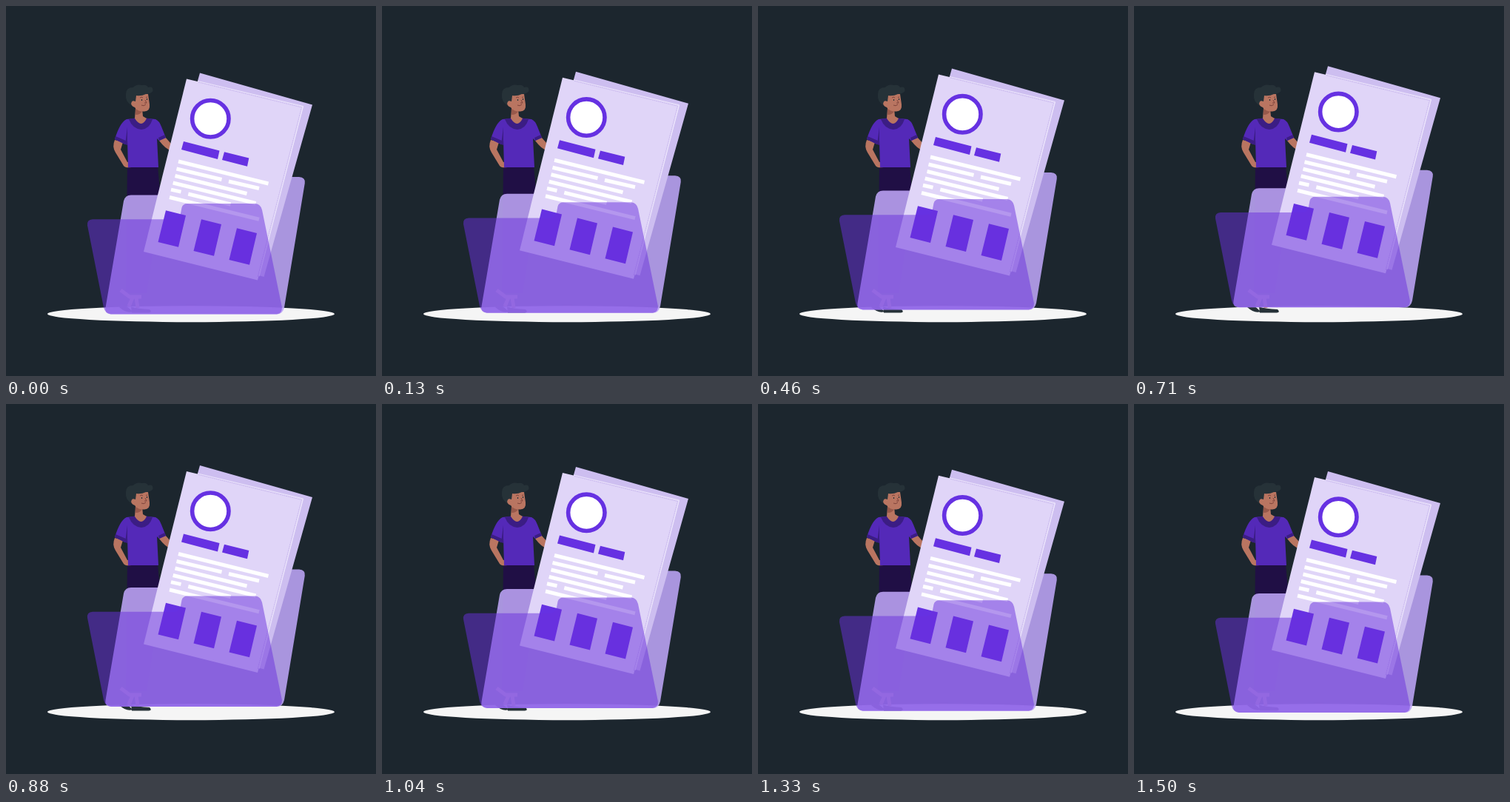
These frames come from a looping animation (500 px wide and 500 px high, 1.54 s). An HTML page:

```html
<!DOCTYPE html>
<html lang="en">
<head>
<meta charset="utf-8">
<title>Floating folder</title>
<style>
  html, body { margin: 0; width: 100%; height: 100%; overflow: hidden; background: #1c262e; }
  svg { display: block; width: 100%; height: 100%; }
</style>
</head>
<body>
<svg viewBox="0 0 500 500">
  <ellipse cx="250" cy="416.2" rx="194" ry="11" fill="#f5f5f5"/>

  <g id="man">
    <path d="M164 216 H205 L209 262 L190 388 H162 Z" fill="#200f45"/>
    <path d="M155 384 L167 393 H183 M171 394 L166 406 M176 394 L178 408" fill="none" stroke="#c98a70" stroke-width="5"/>
    <path d="M155 403 Q164 405 171 413 Q163 416 153 407 Z M169 406.500 Q178 409 194 410 Q198 414 193 414.500 H170 Z" fill="#263238"/>
    <path d="M147 181 Q143 190 148 198 L159 216 Q162 220 175 217 Q176 214 171 211 L164 211 L155 194 L158 184 Z" fill="#b97561"/>
    <path d="M207 181 L215 177 L223 186 V195 Q216 194 207 182 Z" fill="#b97561"/>
    <path d="M163 153 Q182 150 202 153 Q207 155 210 163 L216 178 L207 182 L204 179 L206 218 H165 L164 181 L161 187 L147 180 Q154 157 163 153 Z" fill="#5429b8"/>
    <path d="M148 176 L162 182 L161 187 L147 180 Z M206 178 L214.500 174 L216 178 L207 182 Z M164 164 V188 L161 187 Z" fill="#3b1d84"/>
    <path d="M166 153 Q181 149 198 153 Q194 166 183 167 Q171 166 166 153 Z" fill="#3b1d84"/>
    <path d="M175 138 L174 152 Q183 166 190 152 L185 149 L184 139 Z" fill="#b97561"/>
    <path d="M175 139 L184 142 Q182 147 175 147 Z" fill="#98594b"/>
    <path d="M172 119 H192 L194 133 Q195 142 187 142.500 Q178 143 174 137 Q168 135 169 129 Z" fill="#b97561"/>
    <path d="M169 134 Q161 129 162 119 Q162 110 172 110 Q176 105 184 107 Q190 106 192 110 Q199 108 198.500 115 Q195 119 189 119 Q183 122 176 121 L175 129 Q169 126 169 134 Z" fill="#263238"/>
    <path d="M181 124 Q183 122 185 124 M189 123.500 L191 123 M188 127 L190 131 L187 131 M183 134 Q186 136 189 133" fill="none" stroke="#7a3f38" stroke-width=".9"/>
    <path d="M183.500 126 v2 M190.500 125 v2" stroke="#263238" stroke-width="1.2"/>
  </g>

  <g id="floating">
    <path fill="#bea4f6" fill-opacity=".88" d="M141 417 Q133 416 134.500 408 L159 264 Q161 256 169 256 H283 Q290 255 292 244 Q294 231.500 302 231.500 H396 Q405 232 403.800 240 L376 408 Q374 417 366 417 Z"/>
    <path fill="#cdbef0" d="M262 91 L414 134 L348.500 366.500 L197 323 Z"/>
    <path fill="#e0d5f8" d="M244 99 L402 136.500 L340 371 L186 332.500 Z"/>
    <path fill="none" stroke="#f3eefe" stroke-width=".8" d="M259 102 L401.500 136 L342 366"/>
    <path fill="none" stroke="#c3b2ea" stroke-width=".8" stroke-dasharray="2 .7" d="M260 103.500 L399.500 137.500 L340 367"/>
    <circle cx="276.300" cy="152.800" r="24.700" fill="#fff" stroke="#6631e2" stroke-width="5.600"/>
    <path fill="#6631e2" d="M240 183.500 L288.500 196 L286 207.500 L237 194.500 Z M295 197.800 L328.300 206 L326 217.300 L292 208.500 Z"/>
    <path stroke="#fff" stroke-width="5" d="M233 210.500 L354.500 240.500 M230.500 220.500 L291.500 235 M301 237.500 L342 247 M228.500 230 L325.500 254 M225.700 239.500 L337.500 267 M223 248.700 L236.500 251.700 M246.300 254.500 L303.500 268.500 M221 259 L342 288.800"/>
    <g fill="#6631e2">
      <path id="block" d="M216 276.800 L243 283.600 L233 326.400 L205.500 319.500 Z"/>
      <use href="#block" x="48" y="12"/>
      <use href="#block" x="96" y="24"/>
    </g>
    <path fill="#6a31de" fill-opacity=".5" d="M142 417 Q134 416 132 408 L110 297 Q109 289 117 288.700 H228 Q235 288 236 281 L237.500 273 Q239 267.500 245 267.500 H337 Q344 268 346 276 L373 408 Q373 416 366 417 Z"/>
  </g>
</svg>
<script>
  const floating = document.getElementById("floating");
  const period = 1540, height = 10, lead = 40;

  function draw() {
    const phase = ((performance.now() + lead) % period) / period;
    const lift = height * (1 - Math.abs(1 - 2 * phase));
    floating.setAttribute("transform", `translate(0 ${-lift})`);
    requestAnimationFrame(draw);
  }
  draw();
</script>
</body>
</html>
```
